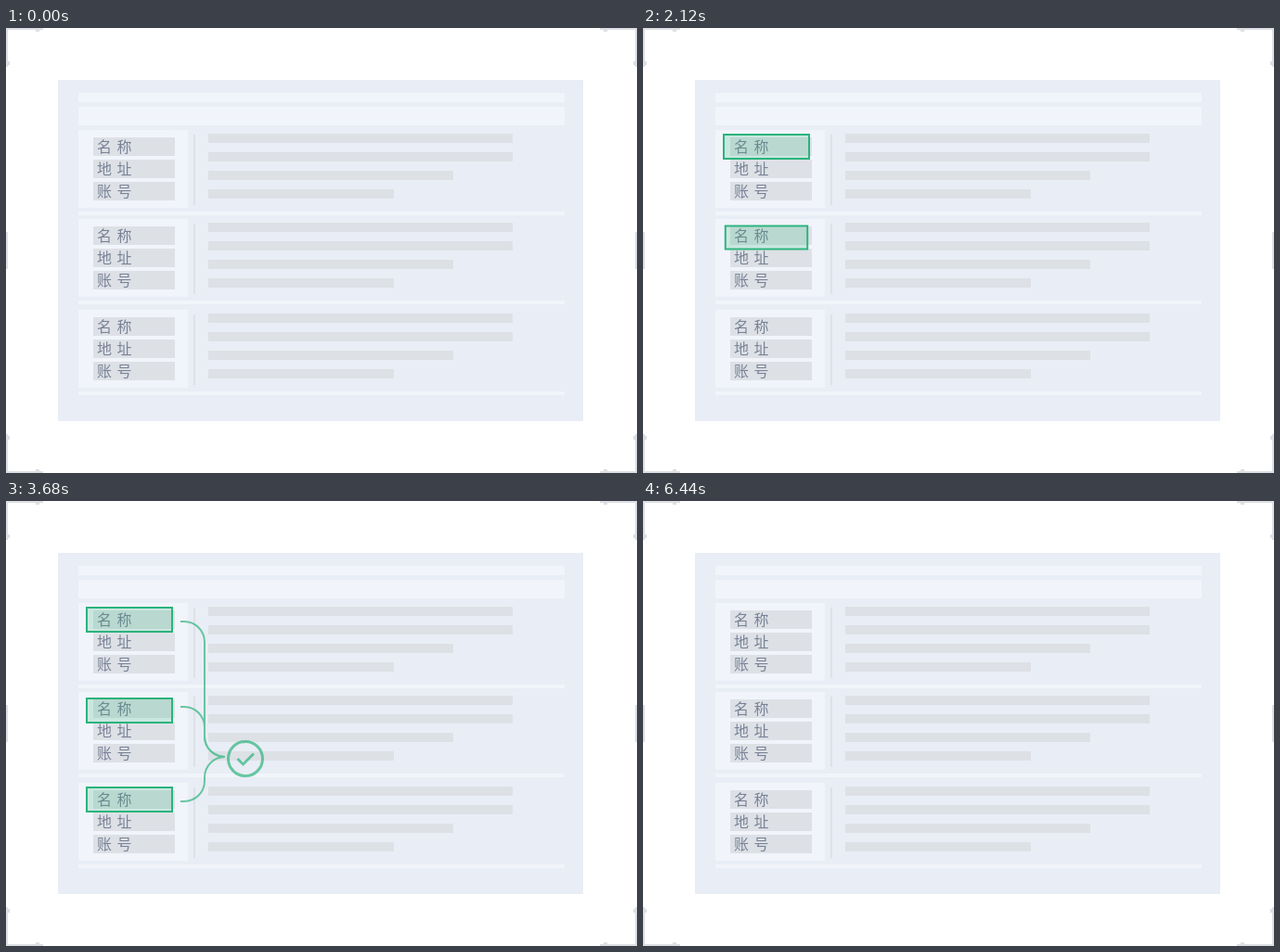
An HTML page for the animation above (7.28 s loop, 680 by 480 pixels).

```html
<!DOCTYPE html>
<html lang="zh-CN">
<head>
<meta charset="utf-8">
<title>Field matching</title>
<style>
  html, body { margin: 0; width: 100%; height: 100%; overflow: hidden; background: #fff; }
  svg { display: block; width: 680px; height: 480px; }
  text { font: 300 16px "Noto Sans CJK SC", "Noto Sans CJK", sans-serif; letter-spacing: 5.5px; fill: #7a8297; }
</style>
</head>
<body>
<svg id="stage" viewBox="0 0 680 480"></svg>
<script>
const LOOP = 7280;
const GROW = 400;
const GREEN = '#2ab37b', LIGHT = '#f1f4fa', GREY = '#dde1e6', FRAME = '#dddfe4';
const stage = document.getElementById('stage');

function add(parent, tag, attrs, text) {
  const node = document.createElementNS('http://www.w3.org/2000/svg', tag);
  for (const key in attrs) node.setAttribute(key, attrs[key]);
  if (text) node.textContent = text;
  return parent.appendChild(node);
}

function box(parent, x, y, width, height, fill) {
  return add(parent, 'rect', { x, y, width, height, fill });
}

function line(parent, d, width) {
  return add(parent, 'path', { d, fill: 'none', stroke: GREEN, 'stroke-width': width });
}

// Corner marks, mirrored into all four corners
for (const sx of [1, -1]) for (const sy of [1, -1]) {
  const corner = add(stage, 'g', {
    transform: `translate(${sx > 0 ? 0 : 680} ${sy > 0 ? 0 : 480}) scale(${sx} ${sy})`
  });
  box(corner, 0, 0, 40, 2, FRAME);
  box(corner, 0, 2, 2, 40, FRAME);
  box(corner, 32, 2, 4, 2, FRAME);
  box(corner, 2, 36, 2, 4, FRAME);
}
box(stage, 0, 220, 2, 40, FRAME);
box(stage, 678, 220, 2, 40, FRAME);

// Document panel
box(stage, 56, 56, 566, 368, '#e9edf5');
box(stage, 78, 70, 524, 10, LIGHT);
box(stage, 78, 85, 524, 20, LIGHT);

for (const top of [110, 206, 304]) {
  const row = add(stage, 'g', { transform: `translate(0 ${top})` });
  box(row, 78, 0, 118, 84, LIGHT);
  box(row, 78, 88, 524, 4, LIGHT);
  box(row, 202, 5, 2, 76, GREY);
  ['名称', '地址', '账号'].forEach((label, i) => {
    box(row, 94, 8 + 24 * i, 88, 20, GREY);
    add(row, 'text', { x: 98, y: 24 + 24 * i }, label);
  });
  [328, 328, 264, 200].forEach((w, i) => box(row, 218, 4 + 20 * i, w, 10, GREY));
}

// Highlights and the link to the check mark
const overlay = add(stage, 'g', {});
const marks = [128, 226, 322].map((y, i) => ({
  y,
  start: 1400 + 420 * i,
  node: add(overlay, 'rect', {
    x: -46, y: -13, width: 92, height: 26,
    fill: GREEN, 'fill-opacity': 0.2, stroke: GREEN, 'stroke-width': 2
  })
}));

const link = add(overlay, 'g', {});
for (const y of [130, 222]) {
  line(link, `M188 ${y}H192A22 22 0 0 1 214 ${y + 22}V254A22 22 0 0 0 236 276`, 2);
}
line(link, 'M188 324H192A22 22 0 0 0 214 302V298A22 22 0 0 1 236 276', 2);
add(link, 'circle', { cx: 258, cy: 278, r: 18.5, fill: 'none', stroke: GREEN, 'stroke-width': 3 });
line(link, 'M249.5 278L255.5 284L267 272.5', 3);

// cubic-bezier(.25, .1, .25, 1)
function ease(p) {
  if (p <= 0) return 0;
  if (p >= 1) return 1;
  const curve = (u, a, b) => 3 * u * (1 - u) ** 2 * a + 3 * u * u * (1 - u) * b + u ** 3;
  let lo = 0, hi = 1;
  for (let i = 0; i < 24; i++) {
    const mid = (lo + hi) / 2;
    if (curve(mid, 0.25, 0.25) < p) lo = mid; else hi = mid;
  }
  return curve(lo, 0.1, 1);
}

function draw(t) {
  for (const { node, y, start } of marks) {
    const s = ease((t - start) / GROW);
    node.setAttribute('transform', `translate(133 ${y}) scale(${s})`);
    node.setAttribute('visibility', s > 0 ? 'visible' : 'hidden');
  }
  link.setAttribute('opacity', ease((t - 3520) / GROW));
  overlay.setAttribute('opacity', 1 - ease((t - 6150) / 280));
}

const begin = performance.now();
function tick() {
  draw((performance.now() - begin) % LOOP);
  requestAnimationFrame(tick);
}
tick();
</script>
</body>
</html>
```
